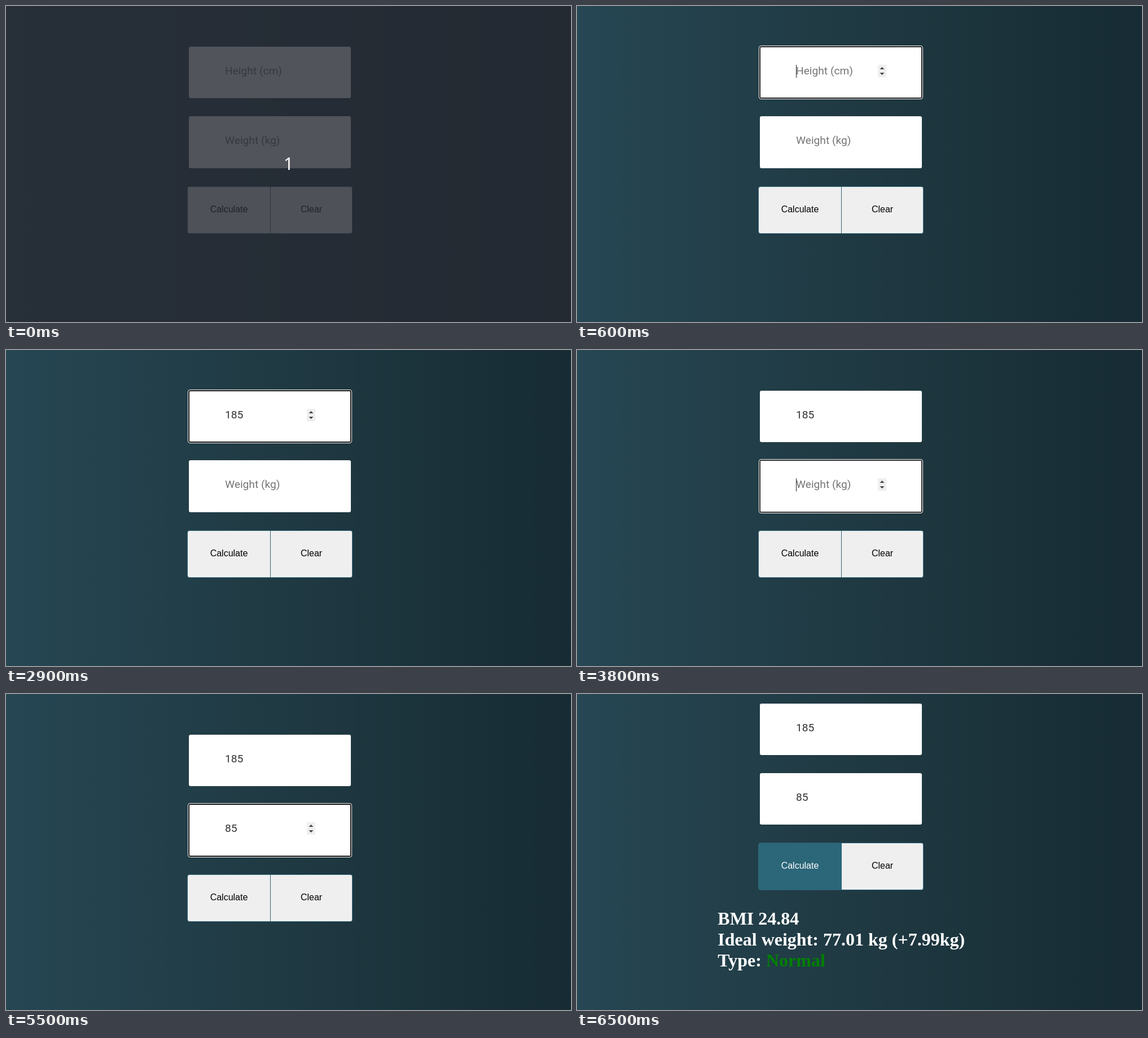
Recreate the animation shown at these times as an HTML page. Size 1001 px wide and 559 px high, loop 8 s.

```html
<!DOCTYPE html>
<html lang="en">
<head>
<meta charset="utf-8">
<title>BMI calculator</title>
<style>
  html, body { margin: 0; width: 100%; height: 100%; overflow: hidden; }
  body { position: relative; background: linear-gradient(90deg, #2c5364 -467px, #203a43 467px, #0f2027 1402px); }
  body * { position: absolute; box-sizing: border-box; }
  #form { left: 0; width: 100%; }
  .field { left: 324px; width: 287px; height: 91.4px; background: #fff; border-radius: 3px; }
  .ring { inset: -2px; border: 1px solid #fff; border-radius: 4px; }
  .text { left: 64px; top: 32px; font: 19.2px/22.6px Roboto, sans-serif; white-space: pre; }
  .caret { top: 32px; width: 1px; height: 22.6px; background: #222; }
  .spin { left: 209px; top: 32px; width: 15px; height: 22px; background: #efefef; }
  .spin path { fill: #444; }
  .button { top: 246.8px; height: 84px; border: 1px solid #2c6679; background: #efefef;
    font: 16px/80px "Liberation Sans", Arial, sans-serif; text-align: center; }
  #calculate { left: 321px; width: 148px; border-radius: 4px 0 0 4px; }
  #clear { left: 469px; width: 145px; border-left: 0; border-radius: 0 4px 4px 0; }
  #result { left: 249.3px; top: 362.8px; color: #fff; white-space: pre;
    font: bold 32px/37px "Liberation Serif", "Times New Roman", serif; }
  #result span { position: static; color: green; }
  #overlay { inset: 0; background: rgba(39, 42, 50, .8); }
  #count { left: 492px; top: 258px; color: #fff; font: 30px/41px "Noto Sans", sans-serif; }
</style>
</head>
<body>
<div id="form">
  <div id="calculate" class="button">Calculate</div>
  <div id="clear" class="button">Clear</div>
  <div id="result">BMI 24.84
Ideal weight: 77.01 kg (+7.99kg)
Type: <span>Normal</span></div>
</div>
<div id="overlay"><div id="count">1</div></div>
<script>
const LOOP = 8000;
const $ = id => document.getElementById(id);
const within = (t, ranges) => ranges.some(([from, to]) => t >= from && t < to);
const show = (el, on) => { el.style.visibility = on ? 'visible' : 'hidden'; };
const mix = (a, b, k) => `rgb(${a.map((v, i) => Math.round(v + (b[i] - v) * k))})`;
// Progress of a transition sampled every 100 ms
const stepped = (t, start, steps) =>
  Math.max(0, Math.min(1, (Math.floor((t - start) / 100) + 1) / steps));

const fields = [
  { top: 0, hint: 'Height (cm)', value: '185', keys: [1800, 2000, 2300],
    focus: [500, 3800], fade: 3, spin: [100, 3800],
    caret: [[500, 1000], [1600, 2900], [3500, 3800]] },
  { top: 123.4, hint: 'Weight (kg)', value: '85', keys: [4700, 4900],
    focus: [3800, 6400], fade: 4, spin: [3600, 6400],
    caret: [[3800, 4400], [4700, 5500], [6000, 6400]] }
];

for (const f of fields) {
  const box = document.createElement('div');
  box.className = 'field';
  box.style.top = f.top + 'px';
  box.innerHTML = `<div class="ring"></div><div class="text"></div><div class="caret"></div>
    <svg class="spin" viewBox="0 0 15 22"><path d="M3.5 8 7.5 4l4 4zM3.5 14l4 4 4-4z"/></svg>`;
  $('form').append(box);
  for (const part of ['ring', 'text', 'caret', 'spin']) f[part + 'El'] = box.querySelector('.' + part);
}

function drawField(f, t) {
  const typed = f.keys.filter(key => t >= key).length;
  f.textEl.textContent = typed ? f.value.slice(0, typed) : f.hint;
  f.textEl.style.color = typed ? '#333' : '#757575';
  f.caretEl.style.left = 64 + Math.floor(typed * 10.78) + 'px';
  show(f.caretEl, within(t, f.caret));
  show(f.spinEl, within(t, [f.spin]));
  show(f.ringEl, within(t, [f.focus]));
  const color = mix([51, 51, 51], [16, 16, 16], stepped(t, f.focus[0], f.fade));
  f.ringEl.style.boxShadow = `inset 0 0 0 2px ${color}`;
}

function draw(now) {
  const t = now % LOOP;
  const done = t >= 6500;
  const hover = stepped(t, 6000, 2);
  fields.forEach(f => drawField(f, t));
  $('form').style.top = (done ? 16.5 : 72) + 'px';
  $('calculate').style.background = mix([239, 239, 239], [44, 102, 121], hover);
  $('calculate').style.color = mix([0, 0, 0], [255, 255, 255], hover);
  show($('result'), done);
  show($('overlay'), t < 100);
  requestAnimationFrame(draw);
}
draw(0);
</script>
</body>
</html>
```
